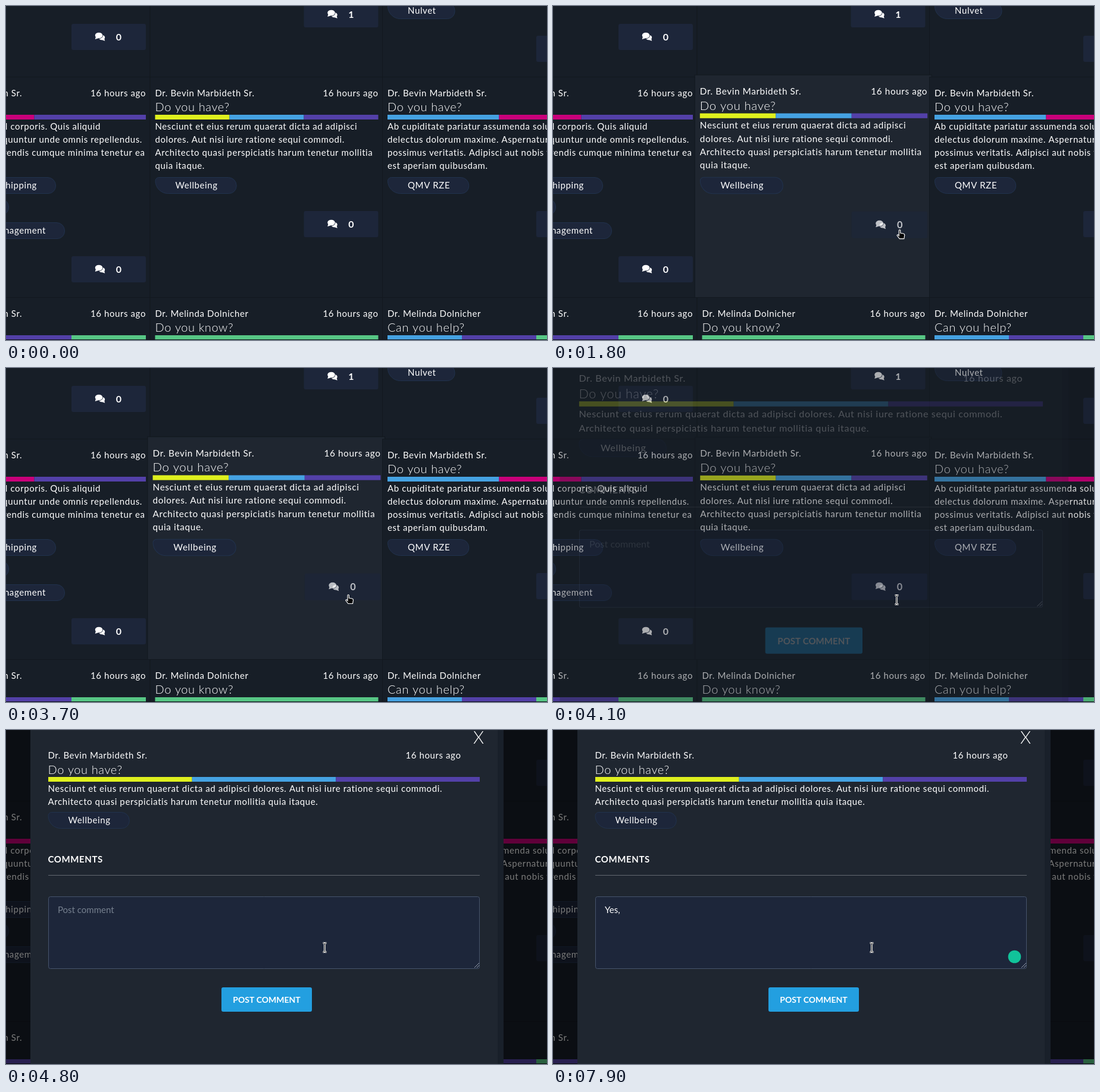
An HTML page with a canvas that plays this animation: 909 px wide and 562 px high, repeating every 8 s.

```html
<!DOCTYPE html>
<html lang="en">
<head>
<meta charset="utf-8">
<style>
  html, body { margin: 0; width: 100%; height: 100%; overflow: hidden; background: #171e27; }
  canvas { position: absolute; left: 0; top: 0; }
</style>
</head>
<body>
<canvas id="page" width="909" height="562"></canvas>
<canvas id="modal" width="909" height="562"></canvas>
<canvas id="pointer" width="909" height="562"></canvas>
<script>
const W = 909, H = 562, LOOP = 8000;
const [page, modal, pointer] = ['page', 'modal', 'pointer'].map(id => document.getElementById(id).getContext('2d'));
let g = page; // context the helpers draw on

const YELLOW = '#dff01e', BLUE = '#45a2e2', PURPLE = '#5340a8', PINK = '#c9007a', GREEN = '#57c785';
const PANEL = '#1f2630', FIELD = '#1d263a', SPACING = 0.6;
const AUTHOR = 'Dr. Bevin Marbideth Sr.', AUTHOR2 = 'Dr. Melinda Dolnicher', AGE = '16 hours ago';
const COLS = [-140, 250.5, 641], ROWS = [-252, 119, 490];
const CARD_W = 390.5, CARD_H = 371, INNER = 375;

// Body lines and tags may carry a right edge for the column cut off at the left.
const cards = [
  { col: 0, row: 0, btn: 282 },
  { col: 1, row: 0, btn: 244, count: 1 },
  { col: 2, row: 0, btn: 302, tags: [['Nulvet', 246]] },
  { col: 0, row: 1, btn: 302, name: AUTHOR, title: 'Do you have?', bars: [PINK, PURPLE],
    body: [['vel corporis. Quis aliquid', 159], ['consequuntur unde omnis repellendus.', 229],
           ['perferendis cumque minima tenetur ea', 233.5]],
    tags: [['Shipping', 169, 84], ['Travel', 205, 5], ['Management', 245, 99]] },
  { col: 1, row: 1, btn: 226, name: AUTHOR, title: 'Do you have?', bars: [YELLOW, BLUE, PURPLE],
    body: [['Nesciunt et eius rerum quaerat dicta ad adipisci'], ['dolores. Aut nisi iure ratione sequi commodi.'],
           ['Architecto quasi perspiciatis harum tenetur mollitia'], ['quia itaque.']],
    tags: [['Wellbeing', 169]] },
  { col: 2, row: 1, btn: 226, name: AUTHOR, title: 'Do you have?', bars: [BLUE, PINK],
    body: [['Ab cupiditate pariatur assumenda soluta'], ['delectus dolorum maxime. Aspernatur'],
           ['possimus veritatis. Adipisci aut nobis vel'], ['est aperiam quibusdam.']],
    tags: [['QMV RZE', 169]] },
  { col: 0, row: 2, name: AUTHOR, title: 'Do you know?', bars: [BLUE, PURPLE, GREEN] },
  { col: 1, row: 2, name: AUTHOR2, title: 'Do you know?', bars: [GREEN] },
  { col: 2, row: 2, name: AUTHOR2, title: 'Can you help?', bars: [BLUE, PURPLE, GREEN] }
];

const ramp = (t, a, b) => Math.min(1, Math.max(0, (t - a) / (b - a)));
const mix = (a, b, p) => a + (b - a) * p;

function text(s, x, y, { font = '15px', space = SPACING, align = 'left', color = '#fff' } = {}) {
  g.font = font + ' Lato, sans-serif';
  g.letterSpacing = space + 'px';
  g.textAlign = align;
  g.fillStyle = color;
  g.fillText(s, x, y);
}

function box(x, y, w, h, r, fill, stroke) {
  g.beginPath();
  g.roundRect(x, y, w, h, r);
  g.fillStyle = fill;
  g.fill();
  if (!stroke) return;
  g.strokeStyle = stroke;
  g.lineWidth = 1;
  g.stroke();
}

function pill(s, x, y, right) {
  g.font = '15px Lato, sans-serif';
  g.letterSpacing = SPACING + 'px';
  const w = g.measureText(s).width + 66;
  if (right !== undefined) x = right - w;
  box(x + 0.5, y + 0.5, w - 1, 27, [6, 14, 13, 22], FIELD, '#21324d');
  text(s, x + 34, y + 19);
}

function stripe(colors, x, y, w) {
  const part = w / colors.length;
  colors.forEach((c, i) => {
    g.fillStyle = c;
    g.fillRect(x + i * part, y, part, 8);
  });
}

// A speech bubble; side is 1 for a tail at the right, -1 at the left.
function bubble(x, y, rx, ry, side) {
  g.save();
  g.translate(x, y);
  g.scale(side, 1);
  g.beginPath();
  g.ellipse(0, 0, rx, ry, 0, 0, 7);
  g.moveTo(rx * 0.7, 0);
  g.lineTo(rx, ry + 1.6);
  g.lineTo(0, ry - 0.3);
  g.closePath();
  g.restore();
}

function replyButton(x, y, count, dim) {
  g.save();
  g.globalAlpha *= 1 - 0.3 * dim;
  box(x, y, 125, 44, 3, FIELD);
  g.fillStyle = '#fff';
  bubble(x + 51, y + 23, 5.2, 4.2, 1);
  g.fill();
  g.strokeStyle = FIELD;
  g.lineWidth = 1.4;
  bubble(x + 46, y + 19.5, 6.3, 4.8, -1);
  g.stroke();
  g.fill();
  text(count, x + 79.5, y + 28, { font: 'bold 16px', align: 'center', space: 0 });
  g.restore();
}

function drawCard(card, { lit, grow }, dim) {
  const x = COLS[card.col], y = ROWS[card.row], right = x + INNER;
  const cx = x + INNER / 2, cy = y + CARD_H / 2, zoom = 1 + 0.021 * grow;
  g.save();
  g.translate(cx, cy);
  g.scale(zoom, zoom);
  g.translate(-cx, -cy);
  box(x - 8.5, y + 0.5, CARD_W, CARD_H, 0, lit ? PANEL : '#171e27', '#12181f');
  if (card.name) {
    text(card.name, x, y + 33);
    text(AGE, right, y + 33, { align: 'right' });
    text(card.title, x, y + 58, { font: '300 20px' });
    stripe(card.bars, x, y + 64, INNER);
  }
  (card.body || []).forEach(([s, end], i) =>
    text(s, end ?? x, y + 89 + 22 * i, { align: end ? 'right' : 'left' }));
  (card.tags || []).forEach(([s, dy, end]) => pill(s, x, y + dy, end));
  if (card.btn) replyButton(right - 125, y + card.btn, card.count || 0, dim);
  g.restore();
}

// The background switches at once, the size follows.
const hover = (t, from, to) => ({
  lit: t >= from && t < to,
  grow: Math.min(ramp(t, from, from + 400), 1 - ramp(t, to, to + 230))
});

function drawPage(t) {
  g = page;
  const still = hover(t, LOOP, LOOP);
  const middle = hover(t, 1430, 4060), last = hover(t, 1320, 1430);
  for (const card of cards) {
    const state = card.row === 1 ? [still, middle, last][card.col] : still;
    drawCard(card, state, state === middle ? middle.grow : 0);
  }
  box(0, H - 1, W, 1, 0, '#0e1218');
}

// Comment box: typed value, caret and helper badge.
const FOCUS = 4850, KEYS = [[5960, 'Y'], [6080, 'Ye'], [6280, 'Yes'], [6950, 'Yes,']];

function drawField(t) {
  const plain = { space: 0 };
  box(71.5, 280.5, 724, 121, 3, FIELD, '#46546c');
  const [since, value] = KEYS.filter(k => k[0] <= t).pop() || [FOCUS, ''];
  if (value) text(value, 87, 308, plain);
  else text('Post comment', 87, 308, { space: 0, color: '#76808f' });
  if (t >= FOCUS && (t - since) % 1060 < 530) {
    g.fillStyle = '#fff';
    g.fillRect(Math.round(87 + (value && g.measureText(value).width)), 293, 1, 18);
  }
  g.strokeStyle = '#9aa3b0';
  g.lineWidth = 1;
  g.beginPath();
  for (const d of [8, 4]) {
    g.moveTo(795 - d, 400);
    g.lineTo(795, 400 - d);
  }
  g.stroke();
  g.globalAlpha = ramp(t, 4850, 5100);
  g.fillStyle = '#11c39a';
  g.beginPath();
  g.arc(775.5, 381.5, 10.8, 0, 7);
  g.fill();
  g.globalAlpha = 1;
}

function drawModal(t) {
  const s = ramp(t, 4058, 4375), p = 1 - (1 - s) ** 2, zoom = 1.1 - 0.1 * p;
  page.fillStyle = `rgba(0,0,0,${0.52 * p})`;
  page.fillRect(0, 0, W, H);
  g = modal;
  g.canvas.style.opacity = p;
  g.clearRect(0, 0, W, H);
  if (!p) return;
  g.save();
  g.translate(433.5, 385);
  g.scale(zoom, zoom);
  g.translate(-433.5, -385);
  box(41, -60, 795, 900, 0, '#19202a');
  box(41, -60, 785, 900, 0, PANEL);
  text('X', 794, 23, { font: '300 29px', space: 0, align: 'center' });
  text(AUTHOR, 70.5, 48);
  text(AGE, 764.5, 48, { align: 'right' });
  text('Do you have?', 70.5, 74, { font: '300 20px' });
  stripe([YELLOW, BLUE, PURPLE], 71, 79, 725);
  text('Nesciunt et eius rerum quaerat dicta ad adipisci dolores. Aut nisi iure ratione sequi commodi.', 70.5, 104);
  text('Architecto quasi perspiciatis harum tenetur mollitia quia itaque.', 70.5, 126);
  pill('Wellbeing', 70.5, 138);
  text('COMMENTS', 70.5, 223, { font: 'bold 15px' });
  box(71, 244, 725, 1, 0, '#636870');
  drawField(t);
  box(362, 433, 152, 41, 3, '#239fe0');
  text('POST COMMENT', 438, 459, { font: 'bold 14px', space: 0, align: 'center' });
  g.restore();
}

const HAND = new Path2D('M4 1.8Q4 .5 5.2 .5T6.4 1.8V6L11.5 7Q13.5 7.5 13.5 9.5L12.5 15.5H5L1 10.5Q.5 8.5 2.5 9L4 10.5Z');
const BEAM = new Path2D('M-3-7.5H-1L0-6.5 1-7.5H3M0-6.5V6.5M-3 7.5H-1L0 6.5 1 7.5H3');

function drawPointer(t) {
  g = pointer;
  g.clearRect(0, 0, W, H);
  if (t < 1000) return;
  g.save();
  if (t < 4050) {
    const a = ramp(t, 1000, 1400), b = ramp(t, 1400, 2000);
    g.translate(mix(909, 592, a) - 22 * b, mix(345, 366, a) + 15 * b);
    g.fillStyle = '#000';
    g.strokeStyle = '#fff';
    g.lineWidth = 1.2;
    g.fill(HAND);
    g.stroke(HAND);
  } else {
    const p = ramp(t, 4350, 4650);
    g.translate(mix(577.5, 535.5, p), mix(390, 366, p));
    for (const [color, width] of [['#fff', 3], ['#000', 1]]) {
      g.strokeStyle = color;
      g.lineWidth = width;
      g.stroke(BEAM);
    }
  }
  g.restore();
}

function frame() {
  const t = performance.now() % LOOP;
  drawPage(t);
  drawModal(t);
  drawPointer(t);
  requestAnimationFrame(frame);
}
frame();
</script>
</body>
</html>
```
